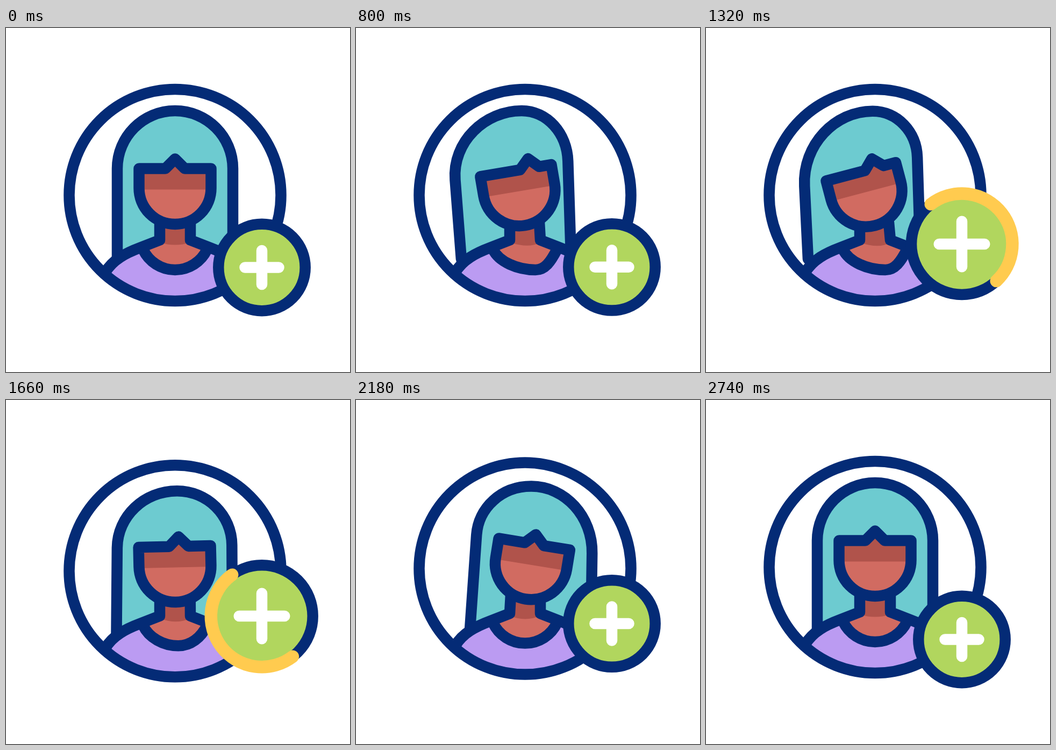
Write an HTML page with a canvas that moves like this. It is 640 px wide and 640 px high and loops after 3 s.

```html
<!DOCTYPE html>
<html lang="en">
<head>
<meta charset="utf-8">
<title>Add user</title>
<style>
  html, body { margin: 0; width: 100%; height: 100%; overflow: hidden; background: #fff; }
  canvas { display: block; width: 640px; height: 640px; }
</style>
</head>
<body>
<canvas width="640" height="640"></canvas>
<script>
const ctx = document.querySelector('canvas').getContext('2d');
const LOOP = 3000, LINE = 20.5, CX = 314.5, CY = 311;
const NAVY = '#042b76', TEAL = '#6dcbd0', SKIN = '#d16b61', SHADE = '#b0534b',
      LILAC = '#bb9bf2', GREEN = '#b1d65e', YELLOW = '#ffcb4f';
const rad = deg => deg * Math.PI / 180;

// Keys are time, value pairs, eased in and out between neighbours.
function track(t, ...keys) {
  if (t <= keys[0]) return keys[1];
  for (let i = 2; i < keys.length; i += 2) {
    if (t < keys[i]) {
      const x = (t - keys[i - 2]) / (keys[i] - keys[i - 2]);
      return keys[i - 1] + (keys[i + 1] - keys[i - 1]) * (1 - Math.cos(Math.PI * x)) / 2;
    }
  }
  return keys[keys.length - 1];
}

function shape(d, fill, stroke, width = LINE) {
  const path = new Path2D(d);
  if (fill) { ctx.fillStyle = fill; ctx.fill(path); }
  if (stroke) { ctx.strokeStyle = stroke; ctx.lineWidth = width; ctx.stroke(path); }
}

function arc(x, y, r, from, to, fill, stroke, width = LINE) {
  ctx.beginPath();
  ctx.arc(x, y, r, from, to);
  if (fill) { ctx.fillStyle = fill; ctx.fill(); }
  ctx.strokeStyle = stroke;
  ctx.lineWidth = width;
  ctx.stroke();
}

// Straight sides lead into a lopsided arch; each side's handle continues its line.
function drawHair(x, y, top, angle, part) {
  const k = 0.552, end = 430;
  const reach = 107.5 - 0.1 * part, tilt = reach * Math.sin(rad(angle));
  const peak = x + part * 0.5 - angle * 0.6;
  const left = { x: x - reach, y: y - tilt, foot: 207 + angle * (angle < 0 ? 1.15 : 0.5) };
  const right = { x: x + reach, y: y + tilt, foot: 422 + (x - CX) * 0.87 };
  const handle = p => {
    const rise = (p.y - top) * k;
    return `${p.x + (p.x - p.foot) * rise / (end - p.y)},${p.y - rise} `;
  };
  shape(`M${left.foot},${end} L${left.x},${left.y} ` +
    `C${handle(left)}${peak - (peak - left.x) * k},${top} ${peak},${top} ` +
    `C${peak + (right.x - peak) * k},${top} ${handle(right)}${right.x},${right.y} ` +
    `L${right.foot},${end}`, TEAL, NAVY);
}

function drawBody(angle, part, dip) {
  const low = CX + part * 0.75;
  const neckL = 286 + Math.max(0, angle) * 0.2, neckR = 343 + Math.min(0, angle) * 0.2;
  const collar = `M255,412 C265.7,435 ${low - 25.5 - part * 0.3},450 ${low},450 ` +
    `C${low + 25.5 - part * 0.3},450 ${363.3 - part * 0.05},435 374,412`;
  const leftSide = 'L286,394.5 L250,408.5 C222,419 199,431 185,454';
  const rightSide = 'L343,394.5 L379,408.5 C407,419 430,431 444,454';
  shape('M286,394.5 ' + leftSide + ' A197,197 0 0 0 444,454 ' +
    'C430,431 407,419 379,408.5 L343,394.5 Z', LILAC);
  shape(collar + ` L379,408.5 L343,394.5 L${neckR},362 H${neckL} L286,394.5 L250,408.5 Z`, SKIN);
  shape(`M${neckL},362 H${neckR} L343,399 Q${CX + part * 0.3},${408 + dip * 0.8} 286,399 Z`, SHADE);
  shape(collar, null, NAVY);
  shape(`M${neckL},362 ` + leftSide, null, NAVY);
  shape(`M${neckR},362 ` + rightSide, null, NAVY);
}

function drawFace(x, y, angle, part) {
  const fringe = `M-67,-36.5 H${part - 18} l18,-18 l18,18 H67 `;
  const face = fringe + 'V0 A67,67 0 0 1 -67,0 Z';
  ctx.save();
  ctx.translate(x, y);
  ctx.rotate(rad(angle));
  shape(face, SKIN);
  shape(fringe + 'V2.5 H-67 Z', SHADE);
  shape(face, null, NAVY);
  ctx.restore();
}

function drawBadge(t) {
  const x = 476;
  const y = 445.5 + track(t, 200, 0, 596, 24, 1092, -43.5, 2000, -43.5, 2470, 0);
  const r = track(t, 990, 80.7, 1500, 99, 2000, 80.7);
  const arm = track(t, 1000, 31.5, 1300, 42.3, 1760, 42.3, 2200, 31.5);
  arc(x, y, r, 0, 2 * Math.PI, GREEN, NAVY);

  if (t > 1000 && t < 2020) {
    const head = -130 + 540 * Math.min(1, (t - 1000) / 980);
    const tail = -130 + 540 * Math.max(0, (t - 1300) / 720) ** 1.57;
    arc(x, y, r, rad(tail), rad(head), null, YELLOW, 23.5);
  }
  shape(`M${x - arm},${y} h${2 * arm} M${x},${y - arm} v${2 * arm}`, null, '#fff');
}

function draw(t) {
  const angle = track(t, 200, 0, 1240, -15.5, 2010, 9.2, 2280, 9.2, 2740, 0);
  const shift = track(t, 200, 0, 1240, -17.8, 1980, 11.4, 2280, 11.4, 2740, 0);
  const dip = track(t, 200, 0, 800, 3.2, 1240, 4.7, 1660, 3.8, 2280, 3.6, 2740, 0);
  const part = track(t, 200, 0, 780, 26, 1280, 26, 1883, 0);
  const lead = track(t, 200, 0, 780, -8, 1240, 0);
  const hairTop = track(t, 1240, 154, 1660, 162, 1980, 158, 2280, 158, 2740, 154);
  const drop = track(t, 1530, 0, 1908, 27, 2250, 0);
  const faceX = CX + shift, faceY = 298 + dip, a = rad(angle);
  const hairX = faceX + 36.5 * Math.sin(a) + lead, hairY = faceY - 36.5 * Math.cos(a);

  ctx.fillStyle = '#fff';
  ctx.fillRect(0, 0, 640, 640);
  ctx.lineCap = ctx.lineJoin = 'round';
  ctx.save();
  ctx.translate(0, drop);
  drawHair(hairX, hairY, hairTop, angle, part);
  drawBody(angle, part, dip);
  drawFace(faceX, faceY, angle, part);
  arc(CX, CY, 197, 0, 2 * Math.PI, null, NAVY);
  ctx.restore();
  drawBadge(t);
}

function tick() {
  draw(performance.now() % LOOP);
  requestAnimationFrame(tick);
}
tick();
</script>
</body>
</html>
```
